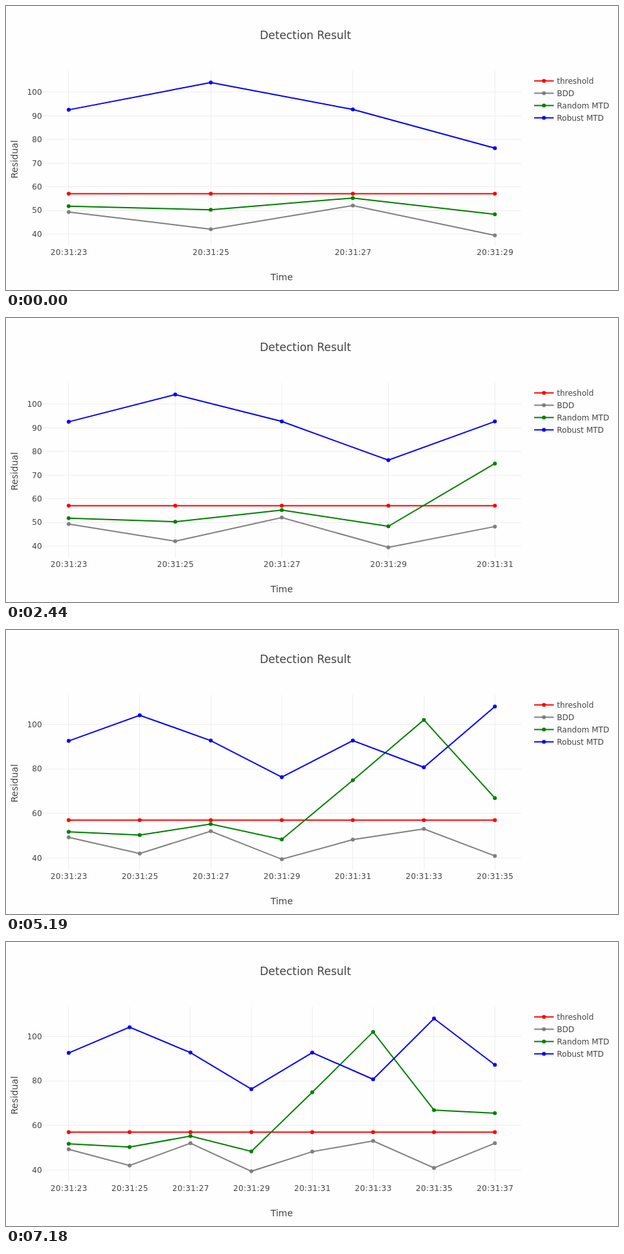
An HTML page for the animation above (8000 ms loop, 942 by 438 pixels).

```html
<!DOCTYPE html>
<html lang="en">
<head>
<meta charset="utf-8">
<title>Detection Result</title>
<style>
  html, body { margin: 0; width: 100%; height: 100%; overflow: hidden; background: #fefefe; }
  svg { display: block; width: 942px; height: 438px; }
  text { font: 12px Verdana, "DejaVu Sans", sans-serif; fill: #444; }
  .title { font-size: 17px; }
  .axis { font-size: 14px; }
  .mid { text-anchor: middle; }
  .end { text-anchor: end; }
  .clock { letter-spacing: .35px; }
  .grid { stroke: #eee; shape-rendering: crispEdges; }
  .line { fill: none; stroke-width: 2; stroke-miterlimit: 2; }
</style>
</head>
<body>
<svg id="stage" viewBox="0 0 942 438"></svg>
<script>
const LOOP = 8000;
const LEFT = 56, RIGHT = 793, TOP = 100, BOTTOM = 370;
const FIRST_X = 96.5, LAST_X = 752.5, BASE_Y = 351.5;

const series = [
  { name: "threshold", color: "#f00", data: Array(8).fill(57) },
  { name: "BDD", color: "#808080", data: [49.25, 42, 52, 39.4, 48.2, 53, 40.9, 52] },
  { name: "Random MTD", color: "#008000", data: [51.75, 50.25, 55.2, 48.3, 74.9, 102, 66.9, 65.5] },
  { name: "Robust MTD", color: "#00f", data: [92.55, 104.1, 92.7, 76.3, 92.7, 80.7, 108, 87.2] }
];

// A new sample arrives at each step; the axis rescales once.
const wide = { unit: 3.642, tick: 10 };
const tall = { unit: 3.433, tick: 20 };
const steps = [
  { at: 0, count: 4, axis: wide },
  { at: 1280, count: 5, axis: wide },
  { at: 3220, count: 6, axis: wide },
  { at: 5190, count: 7, axis: tall },
  { at: 7180, count: 8, axis: tall }
];

const stage = document.getElementById("stage");

function add(parent, tag, attrs, text) {
  const node = document.createElementNS("http://www.w3.org/2000/svg", tag);
  for (const key in attrs) node.setAttribute(key, attrs[key]);
  if (text !== undefined) node.textContent = text;
  parent.append(node);
  return node;
}

const label = (parent, x, y, cls, text) => add(parent, "text", { x, y, class: cls }, text);
const gridLine = (parent, x1, y1, x2, y2) => add(parent, "line", { x1, y1, x2, y2, class: "grid" });
const pixel = v => Math.floor(v) + 0.5;

function trace(parent, points, color) {
  add(parent, "polyline", { points: points.join(" "), stroke: color, class: "line" });
  for (const [cx, cy] of points) add(parent, "circle", { cx, cy, r: 3, fill: color });
}

function buildChart({ count, axis }) {
  const group = add(stage, "g", { display: "none" });
  const xAt = i => FIRST_X + (LAST_X - FIRST_X) * i / (count - 1);
  const yAt = v => BASE_Y - (v - 40) * axis.unit;

  for (let i = 0; i < count; i++) {
    const x = pixel(xAt(i));
    gridLine(group, x, TOP, x, BOTTOM);
    label(group, xAt(i) + 0.4, 384, "mid clock", "20:31:" + (23 + 2 * i));
  }
  for (let v = 40; v <= 100; v += axis.tick) {
    const y = pixel(yAt(v));
    gridLine(group, LEFT, y, RIGHT, y);
    label(group, 55.3, yAt(v) + 4.3, "end", v);
  }
  for (const s of series) {
    trace(group, s.data.slice(0, count).map((v, i) => [xAt(i), yAt(v)]), s.color);
  }
  return group;
}

label(stage, 461, 51, "title mid", "Detection Result");
label(stage, 424.5, 423, "axis mid", "Time");
label(stage, 0, 0, "axis mid", "Residual").setAttribute("transform", "translate(18 236.5) rotate(-90)");
series.forEach((s, i) => {
  const y = 115.5 + 19 * i;
  add(stage, "path", { d: `M813 ${y}h30`, stroke: s.color, class: "line" });
  add(stage, "circle", { cx: 828, cy: y, r: 3, fill: s.color });
  label(stage, 848, y + 4.5, "", s.name);
});

const charts = steps.map(buildChart);
const start = performance.now();
let shown = -1;

function draw(now) {
  const t = Math.max(0, now - start) % LOOP;
  const current = steps.filter(s => s.at <= t).length - 1;
  if (current !== shown) {
    charts.forEach((g, i) => g.setAttribute("display", i === current ? "inline" : "none"));
    shown = current;
  }
  requestAnimationFrame(draw);
}
draw(start);
</script>
</body>
</html>
```
